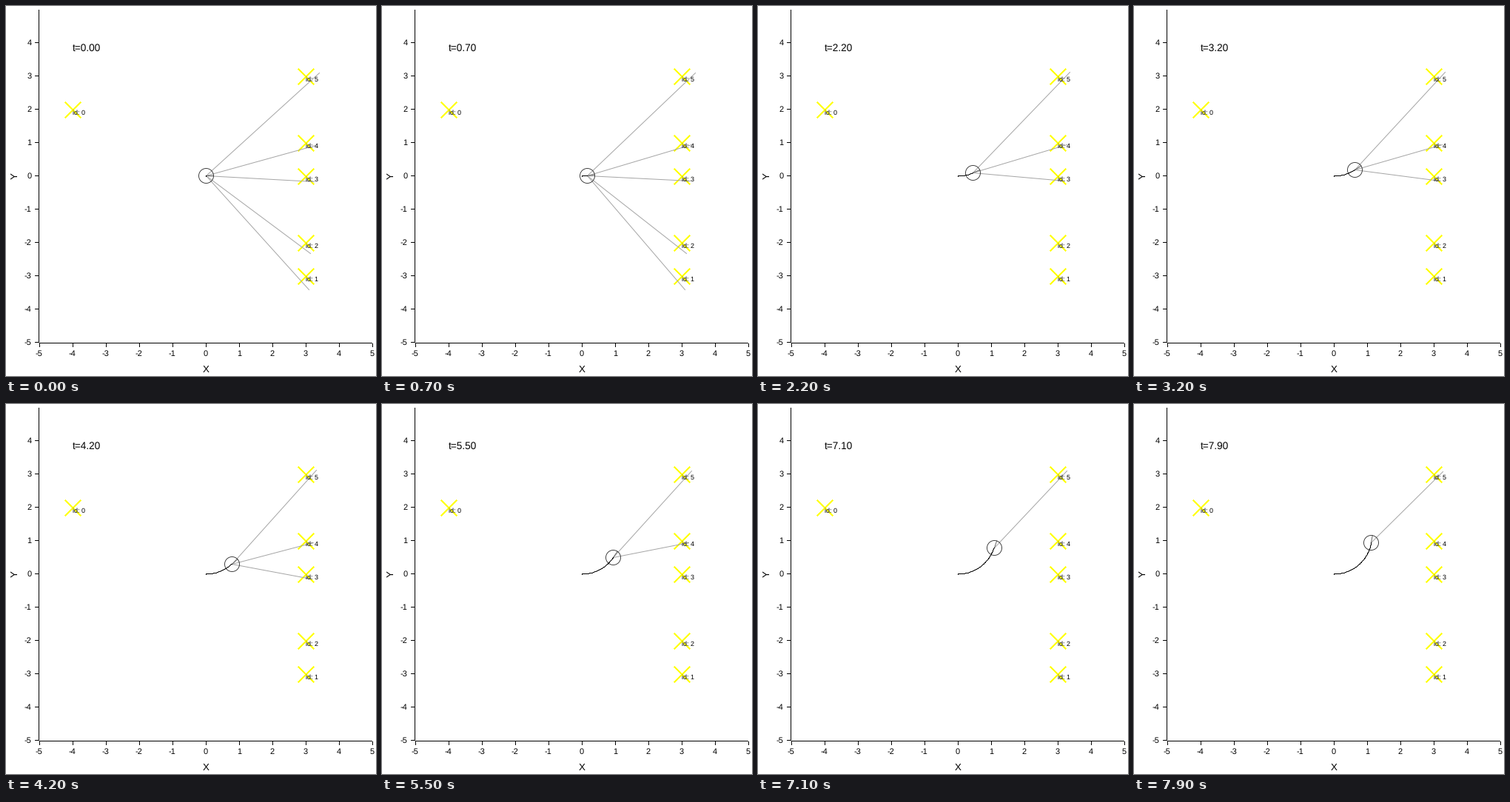
Animation, 500 px wide and 500 px high, one loop 8000 ms. Source, as a matplotlib script:

```python
import numpy as np
import matplotlib.pyplot as plt
from matplotlib.animation import FuncAnimation

plt.rcParams["font.family"] = "Liberation Sans"
plt.rcParams["text.hinting"] = "no_hinting"

SIZE, DPI = 500, 100
PX = 72 / DPI                      # one pixel in points
FRAMES, STEP = 80, 0.1             # frame count, seconds per frame
SPEED, TURN = 0.2, np.radians(10)  # robot velocity and yaw rate
FOV = np.radians(60)
RANGE_GAIN, BEARING_BIAS = 1.088, np.radians(-2.75)
YELLOW, GRAY = "#ffff00", "#a6a6a6"

LANDMARKS = [(-4, 2), (3, -3), (3, -2), (3, 0), (3, 1), (3, 3)]


def to_px(x, y):
    """World coordinates to the centre of the pixel they fall in."""
    return (np.floor(270 + 45 * np.asarray(x) + 1e-9) + 0.5,
            np.floor(230 - 45 * np.asarray(y) + 1e-9) + 0.5)


def pose(t):
    """Pose on the circular arc driven from the origin."""
    a, r = TURN * t, SPEED / TURN
    return r * np.sin(a), r * (1 - np.cos(a)), a


fig = plt.figure(figsize=(SIZE / DPI, SIZE / DPI), dpi=DPI, facecolor="white")
ax = fig.add_axes([0, 0, 1, 1])
ax.set(xlim=(0, SIZE), ylim=(SIZE, 0))
ax.axis("off")


def line(xs=(), ys=(), color="black", z=2, smooth=True):
    """One-pixel line between pixel centres, both ends included."""
    return ax.plot(xs, ys, color=color, lw=PX, zorder=z, snap=False,
                   antialiased=smooth, solid_capstyle="projecting")[0]


def label(x, y, s, size, **kw):
    return ax.text(x, y, s, fontsize=size * PX, zorder=5, **kw)


# Axes
line([44.5, 44.5], [5.5, 454.5])
line([45.5, 494.5], [455.5, 455.5])
for v in range(-5, 6):
    x, y = 270.5 + 45 * v, 229.5 - 45 * v
    line([x, x], [456.5, 460.5])
    label(x - (0.5 if v >= 0 else 1.5), 473, str(v), 11, ha="center")
    if v < 5:
        line([39.5, 43.5], [y, y])
        label(34.5, y + 3.6, str(v), 11, ha="right")
label(270, 495, "X", 13.4, ha="center")
label(12, 230, "Y", 13.4, ha="center", va="center", rotation=90)

# Landmarks
for i, (x, y) in enumerate(LANDMARKS):
    cx, cy = to_px(x, y)
    for s in (10, -10):
        line([cx - 10, cx + 10], [cy - s, cy + s], YELLOW, 1, smooth=False)
    label(cx - 0.5, cy + 6.7, f"id: {i}", 9)

# Moving parts
clock = label(90, 60.6, "", 13.6)
rays = [line(color=GRAY) for _ in LANDMARKS]
heading = line(color="#666666", z=3)
path = line(z=4)
body = plt.Circle((0, 0), 10, fill=False, ec="#333333", lw=0.9 * PX, zorder=3)
ax.add_patch(body)


def update(k):
    x, y, a = pose((k + 1) * STEP)
    cx, cy = to_px(x, y)
    clock.set_text(f"t={k * STEP:.2f}")
    body.center = (cx, cy)
    heading.set_data([cx, cx + 10 * np.cos(a)], [cy, cy - 10 * np.sin(a)])
    px, py, _ = pose(np.arange(k + 2) * STEP)
    path.set_data(*to_px(px, py))
    for ray, (lx, ly) in zip(rays, LANDMARKS):
        dist = np.hypot(lx - x, ly - y)
        bearing = np.arctan2(ly - y, lx - x)
        offset = (bearing - a + np.pi) % (2 * np.pi) - np.pi
        ray.set_visible(abs(offset) <= FOV)
        seen, b = dist * RANGE_GAIN, bearing + BEARING_BIAS
        ex, ey = to_px(x + seen * np.cos(b), y + seen * np.sin(b))
        ray.set_data([cx, ex], [cy, ey])
    return [clock, body, heading, path, *rays]


anim = FuncAnimation(fig, update, frames=FRAMES, interval=1000 * STEP,
                     repeat=True, repeat_delay=0, blit=False)
plt.show()
```
